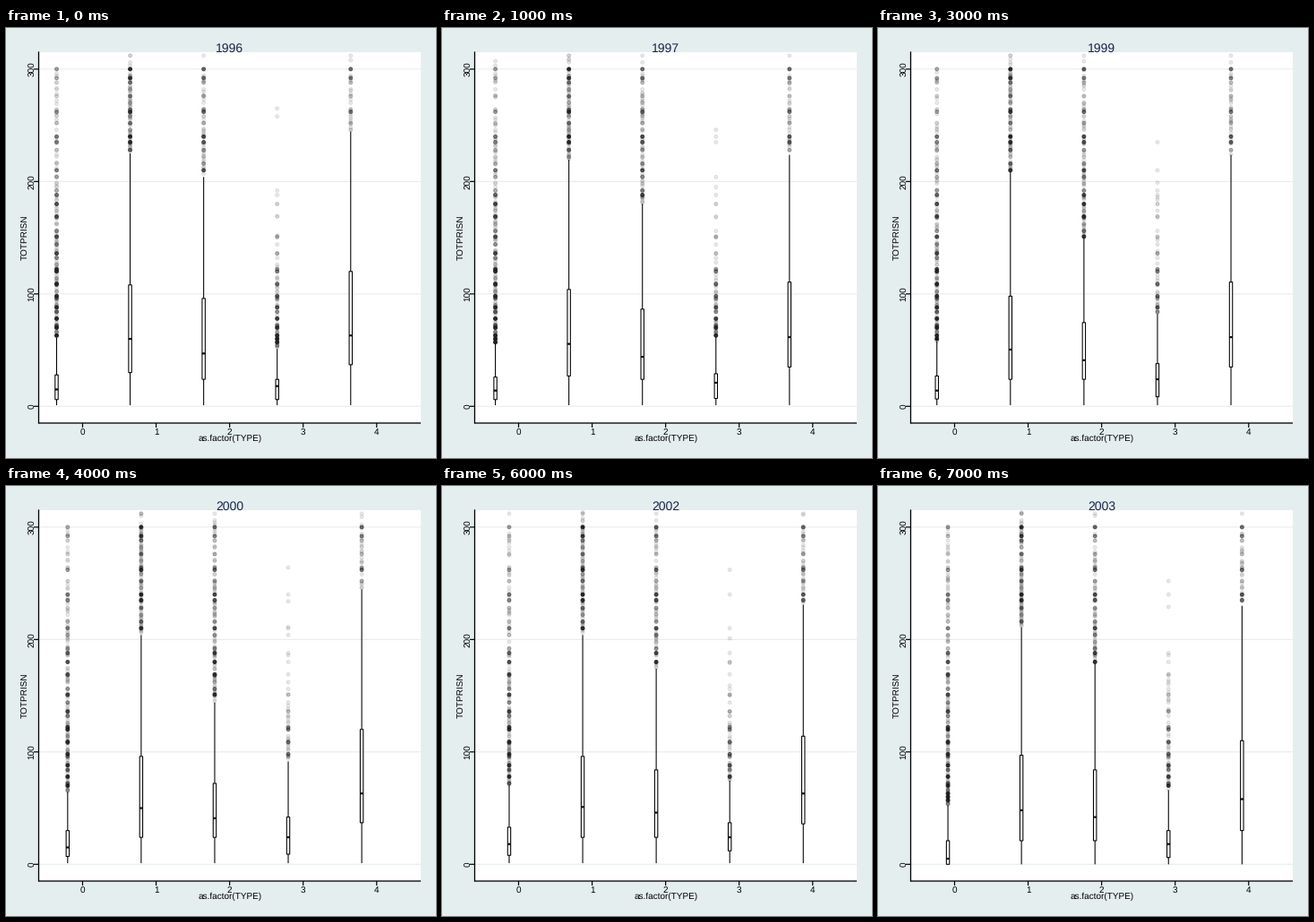
Write a matplotlib script that moves like this. It is 480 by 480 pixels and loops after 8 s.

```python
import matplotlib.pyplot as plt
import numpy as np
from matplotlib.animation import ArtistAnimation
from matplotlib.patches import Rectangle

PT = 0.72  # points per pixel at 100 dpi
LEFT, TOP, RIGHT, BOTTOM = 36.5, 27, 463, 441
INK, NAVY, PAPER, GRID = "black", "#182549", "#e5eeef", "#e5edee"
plt.rcParams.update({
    "font.family": ["Liberation Sans", "DejaVu Sans"],
    "text.hinting": "none",
    "text.hinting_factor": 1,
    "path.snap": False,
})

# Quartiles of each type in the key years; other years lie between them.
KEY_YEARS = [1996, 1998, 2000, 2001, 2002, 2003]
LOWER = [[6, 6, 7, 8, 8, 0], [30, 24, 24, 24, 24, 21], [24, 24, 24, 24, 24, 21],
         [6, 8, 9, 10, 12, 6], [37, 33, 37, 36, 36, 30]]
MIDDLE = [[15, 13, 15, 16, 18, 5], [60, 51, 50, 48, 51, 48], [47, 41, 41, 46, 46, 42],
          [18, 24, 24, 24, 24, 18], [63, 60, 63, 63, 63, 58]]
UPPER = [[28, 24, 30, 30, 33, 21], [108, 100, 96, 90, 96, 97], [96, 77, 72, 78, 84, 84],
         [24, 34, 42, 41, 37, 30], [120, 101, 120, 117, 114, 110]]

# Outliers thin out as LEVEL * exp(-value / REACH).
LEVEL = [3.6, 2.8, 4.2, 9, 2.5]
REACH = [120, 500, 155, 40, 200]

# Favoured values climb by a constant ratio.
LADDER = {round(292 / 1.1157 ** k) for k in range(17)}


def weight(v):
    if v % 60 == 0:
        return 16
    if v in LADDER:
        return 12
    return 5 if v % 12 == 0 else 2 if v % 6 == 0 else 0.4


def quartiles(year, kind):
    return [np.interp(year, KEY_YEARS, q[kind]) for q in (LOWER, MIDDLE, UPPER)]


def outliers(year, kind, fence):
    """Values above the fence and how many cases share each."""
    rng = np.random.default_rng(10 * year + kind)
    values = np.arange(int(fence) + 1, 316)
    cases = np.array([weight(v) for v in values]) * LEVEL[kind]
    cases = cases * np.exp(-values / REACH[kind]) * np.where(values > 300, 0.3, 1)
    cases = np.floor(cases + rng.random(len(values)))
    return values[cases > 0], cases[cases > 0]


def px(kind):
    return 85.5 + 82.07 * kind


def py(v):
    return 422.3 - 1.2547 * np.asarray(v)


fig = plt.figure(figsize=(4.8, 4.8), dpi=100, facecolor=PAPER)
ax = fig.add_axes([0, 0, 1, 1])
ax.set(xlim=(0, 480), ylim=(480, 0))
ax.axis("off")


def line(xs, ys, width=1.07, color=INK, z=2, cap="butt"):
    return ax.plot(xs, ys, color=color, lw=width * PT, zorder=z,
                   solid_capstyle=cap)[0]


def label(x, y, text, size=10, color=INK, turn=0):
    return ax.text(x, y, text, size=size * PT, color=color, rotation=turn,
                   ha="center", va="baseline", rotation_mode="anchor", zorder=6)


panel = Rectangle((LEFT, TOP), RIGHT - LEFT, BOTTOM - TOP, fc="white", lw=0, zorder=0)
ax.add_patch(panel)
for v in range(0, 301, 100):
    line([LEFT, RIGHT], [py(v)] * 2, 1.07, GRID, 1)
    line([31, LEFT], [py(v)] * 2, 1.2)
    label(32.6, py(v), str(v), 9.7, turn=90)
for kind in range(5):
    line([px(kind)] * 2, [BOTTOM, 446], 1.2)
    label(px(kind), 454.5, str(kind), 9.7)
line([LEFT, LEFT], [TOP, BOTTOM], 1.3, cap="projecting")
line([LEFT, RIGHT], [BOTTOM, BOTTOM], 1.3)
label(249.7, 461, "as.factor(TYPE)")
label(24.6, 234, "TOTPRISN", turn=90)


def draw_box(x, low, mid, high, floor, fence):
    body = Rectangle((x - 1.7, py(high)), 3.4, py(low) - py(high), fc="white",
                     ec=INK, lw=1.07 * PT, zorder=3)
    ax.add_patch(body)
    return [line([x, x], py([floor, fence])), body,
            line([x - 1.7, x + 1.7], py([mid, mid]), 2.1, z=4)]


def draw_dots(x, values, cases):
    tint = np.full((len(values), 4), 0.1)
    tint[:, 3] = 1 - 0.9 ** cases
    dots = ax.scatter(np.full(len(values), x), py(values), s=(4 * PT) ** 2,
                      c=tint, edgecolors=tint, linewidths=0.9 * PT, zorder=5)
    dots.set_clip_path(panel)
    return dots


def draw_year(year):
    parts = [label(249.7, 27, str(year), 14.2, NAVY)]
    for kind in range(5):
        x = px(kind) - 29 + 3.08 * (year - 1996)
        low, mid, high = quartiles(year, kind)
        fence = high + 1.5 * (high - low)
        parts += draw_box(x, low, mid, high, int(year < 2003), fence)
        parts.append(draw_dots(x, *outliers(year, kind, fence)))
    return parts


anim = ArtistAnimation(fig, [draw_year(y) for y in range(1996, 2004)],
                       interval=1000, repeat=True, repeat_delay=0)
plt.show()
```
